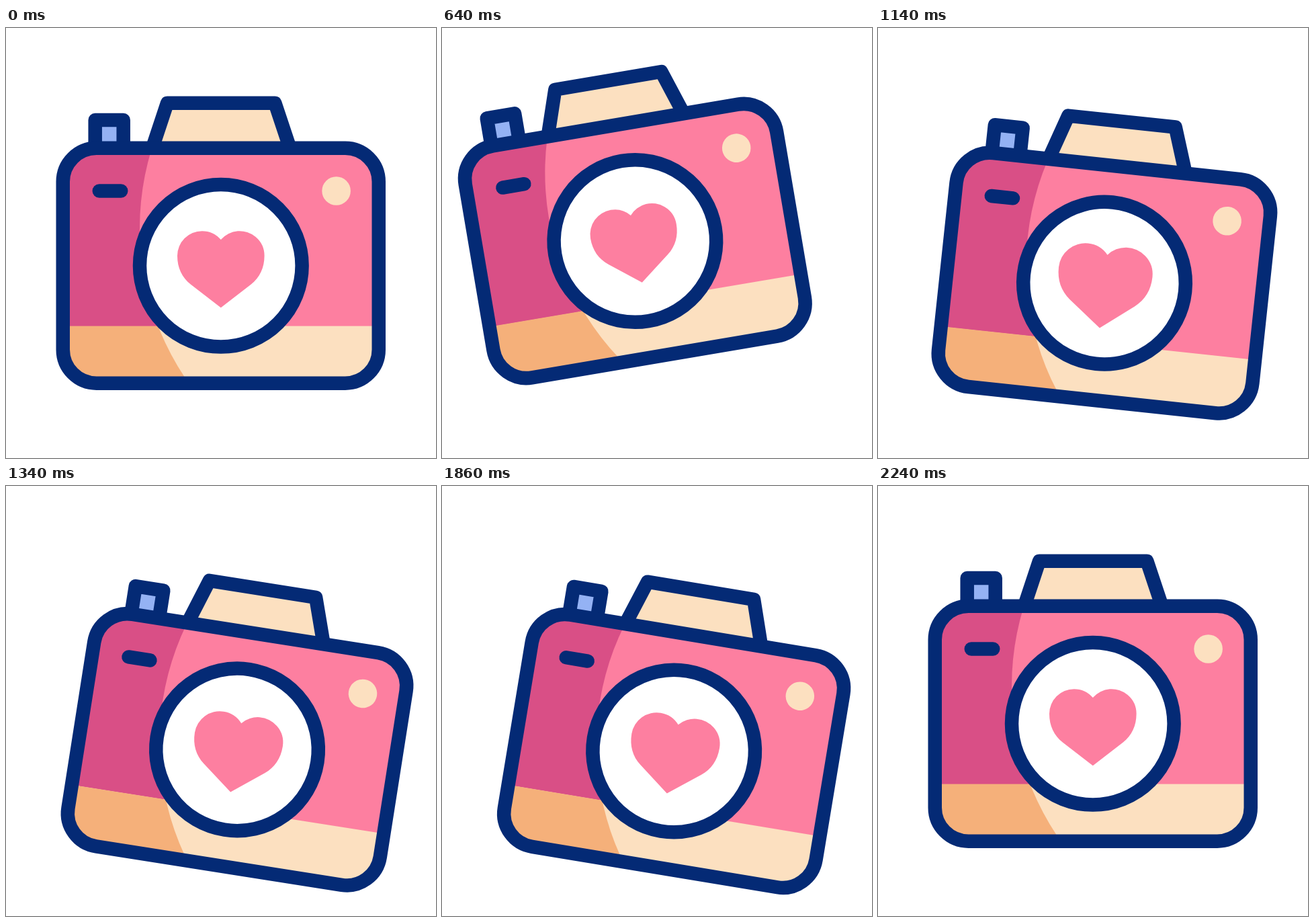
An HTML page with a canvas for the animation above (2400 ms loop, 640 by 640 pixels).

```html
<!DOCTYPE html>
<html lang="en">
<head>
<meta charset="utf-8">
<title>Camera</title>
<style>
html, body { margin: 0; width: 100%; height: 100%; overflow: hidden; background: #fff; }
canvas { display: block; width: 640px; height: 640px; }
</style>
</head>
<body>
<canvas id="stage"></canvas>
<script>
const SIZE = 640, LOOP = 2400, STEP = 20, LINE = 20.5;
const NAVY = '#042a75', PINK = '#fd7fa0', PLUM = '#d94f86', CREAM = '#fce0c0',
  ORANGE = '#f5b07a', BLUE = '#94b2f4', YELLOW = '#fecd50', WHITE = '#fff';

const canvas = document.getElementById('stage');
const ctx = canvas.getContext('2d');
const dpr = window.devicePixelRatio || 1;
canvas.width = canvas.height = SIZE * dpr;

// Keyframes as [ms, value], eased in and out between neighbours
const TILT = [[200, 0], [700, -10], [1000, 10], [1200, 5], [1400, 10], [1800, 10], [2200, 0]];
const BEAT = [[200, 1], [400, 1.105], [600, 1], [1000, 1], [1200, 1.105], [1400, 1],
  [1800, 1], [2000, 1.105], [2200, 1]];
const CLICK = [[1400, 0], [1600, 1], [1800, 0]];
const RAY_END = [[1400, 0], [1600, 1]];
const RAY_START = [[1600, 0], [1800, 1]];

function at(keys, t) {
  if (t <= keys[0][0]) return keys[0][1];
  for (let i = 1; i < keys.length; i++) {
    const [t0, a] = keys[i - 1], [t1, b] = keys[i];
    if (t <= t1) {
      const u = (t - t0) / (t1 - t0);
      return a + (b - a) * u * u * (3 - 2 * u);
    }
  }
  return keys[keys.length - 1][1];
}

function shape(build, fill, stroke) {
  ctx.beginPath();
  build();
  if (fill) { ctx.fillStyle = fill; ctx.fill(); }
  if (stroke) { ctx.strokeStyle = stroke; ctx.stroke(); }
}

const dot = (x, y, r, fill, stroke) => shape(() => ctx.arc(x, y, r, 0, Math.PI * 2), fill, stroke);

const poly = (points, fill, stroke) =>
  shape(() => points.forEach(([x, y]) => ctx.lineTo(x, y)), fill, stroke);

function box(x, y, w, h, color) {
  ctx.fillStyle = color;
  ctx.fillRect(x, y, w, h);
}

function bodyPath() {
  const l = 84.75, t = 178.8, r = 554.75, b = 528.7, c = 50;
  ctx.moveTo(l + c, t);
  ctx.arcTo(r, t, r, b, c);
  ctx.arcTo(r, b, l, b, c);
  ctx.arcTo(l, b, l, t, c);
  ctx.arcTo(l, t, r, t, c);
  ctx.closePath();
}

function body() {
  ctx.save();
  ctx.beginPath();
  bodyPath();
  ctx.clip();
  box(80, 170, 480, 274, PLUM);
  box(80, 443.6, 480, 90, ORANGE);
  // The lit side is everything inside a wide circle
  ctx.beginPath();
  ctx.arc(600, 298, 401, 0, Math.PI * 2);
  ctx.clip();
  box(80, 170, 480, 274, PINK);
  box(80, 443.6, 480, 90, CREAM);
  ctx.restore();
  shape(bodyPath, null, NAVY);
}

function heart(scale) {
  ctx.save();
  ctx.translate(319.8, 359);
  ctx.scale(scale, scale);
  shape(() => {
    ctx.moveTo(0, 57.3);
    ctx.lineTo(-45, 22.5);
    ctx.bezierCurveTo(-58, 12, -64.8, -2, -64.8, -20);
    ctx.arc(-28, -20, 36.8, Math.PI, Math.PI * 2 - 0.706);
    ctx.arc(28, -20, 36.8, Math.PI + 0.706, Math.PI * 2);
    ctx.bezierCurveTo(64.8, -2, 58, 12, 45, 22.5);
    ctx.closePath();
  }, PINK);
  ctx.restore();
}

function camera(t) {
  const click = at(CLICK, t);
  ctx.save();
  ctx.translate(84.75, 528.5);
  ctx.rotate(at(TILT, t) * Math.PI / 180);
  ctx.translate(-84.75, -528.5);

  const press = 7.1 * click;
  poly([[132.7, 185 + press], [132.7, 136.9 + press], [174.7, 136.9 + press], [174.7, 185 + press]], BLUE, NAVY);
  poly([[217.7, 179], [240, 111.8], [400.3, 111.8], [422.7, 179]], CREAM, NAVY);
  body();
  poly([[138.8, 242.6], [171.2, 242.6]], null, NAVY);
  dot(491.6, 242.5, 21.3, CREAM);
  dot(319.8, 353.8, 120.8 + 9 * click, WHITE, NAVY);
  heart(at(BEAT, t));
  ctx.restore();
}

function rays(t) {
  if (t <= 1400 || t >= 1800) return;
  const from = 70.5 + 38 * at(RAY_START, t), to = 70.5 + 38 * at(RAY_END, t);
  for (const deg of [-40, -10, 20]) {
    const a = deg * Math.PI / 180;
    const point = r => [213 + r * Math.sin(a), 188.5 - r * Math.cos(a)];
    poly([point(from), point(to)], null, YELLOW);
  }
}

function draw(t) {
  ctx.setTransform(dpr, 0, 0, dpr, 0, 0);
  box(0, 0, SIZE, SIZE, WHITE);
  ctx.lineWidth = LINE;
  ctx.lineCap = ctx.lineJoin = 'round';
  camera(t);
  rays(t);
}

const start = performance.now();
function tick() {
  const t = (performance.now() - start) % LOOP;
  draw(Math.floor(t / STEP) * STEP);
  requestAnimationFrame(tick);
}
tick();
</script>
</body>
</html>
```
